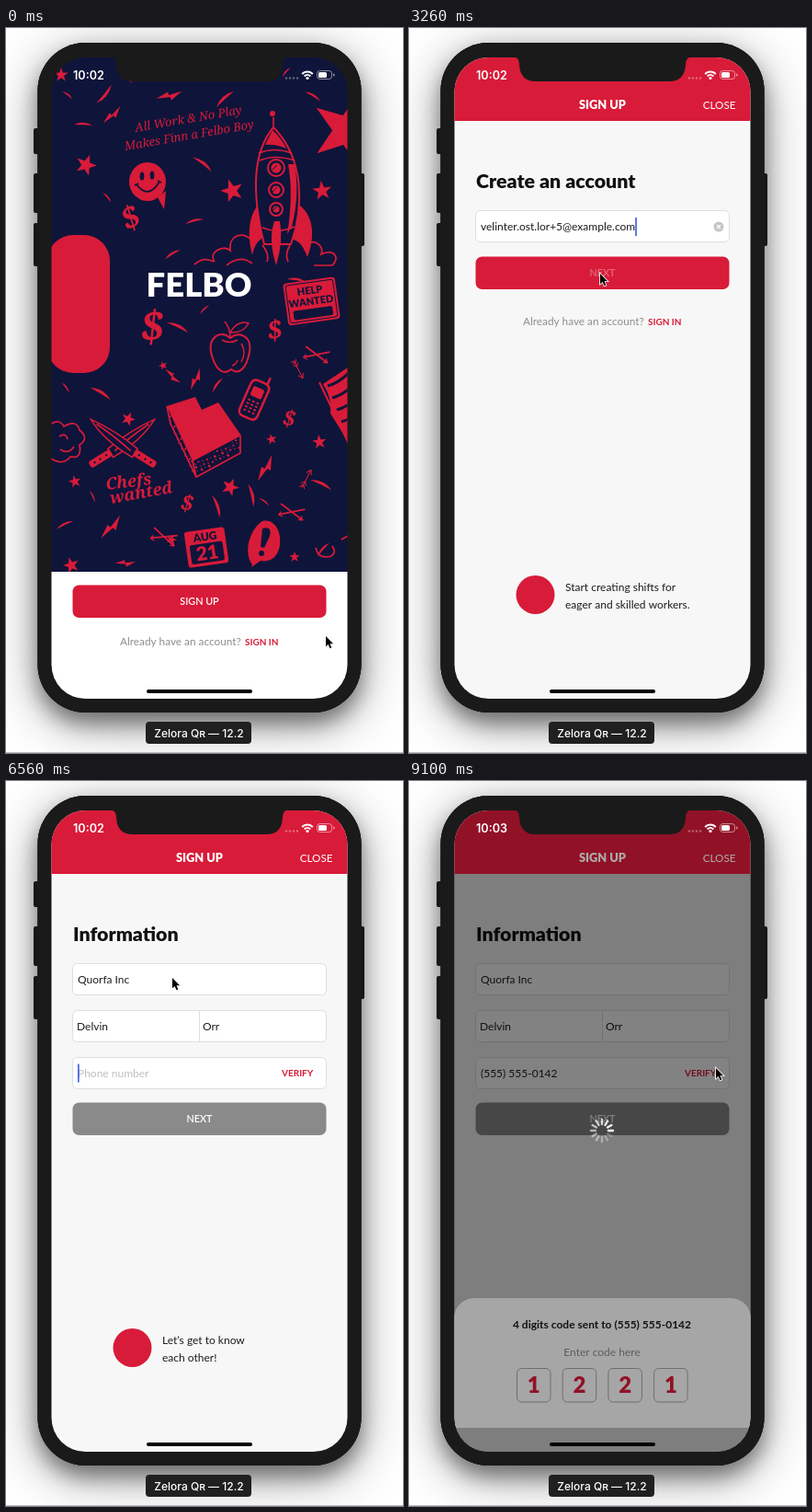
These frames come from a looping animation (432x788 px, 9120 ms). An HTML page with a canvas:

```html
<!DOCTYPE html>
<html lang="en">
<head>
<meta charset="utf-8">
<title>Sign up flow</title>
<style>
html, body { margin: 0; width: 100%; height: 100%; overflow: hidden; background: #fff; }
canvas { display: block; }
</style>
</head>
<body>
<canvas id="stage" width="432" height="788"></canvas>
<script>
const c = document.getElementById('stage').getContext('2d');
const LOOP = 9120;
const RED = '#d81b39', NAVY = '#0f143a', PAPER = '#f7f7f7', INK = '#1c1c1e';
const BODY = 'Lato, sans-serif', UI = 'Inter, sans-serif', SCRIPT = '"Noto Serif", serif';
const EMAIL = 'velinter.ost.lor+5@example.com', PHONE = '(555) 555-0142';

const clamp = v => Math.max(0, Math.min(1, v));
const span = (t, a, b) => clamp((t - a) / (b - a));
const easeOut = p => 1 - (1 - p) ** 3;
const smooth = p => p * p * (3 - 2 * p);
const between = (t, a, b) => t >= a && t < b;
const typed = (s, t, a, b) => s.slice(0, Math.floor(span(t, a, b) * s.length));

function box(x, y, w, h, r, fill, stroke) {
  c.beginPath();
  c.roundRect(x, y, w, h, r);
  if (fill) { c.fillStyle = fill; c.fill(); }
  if (stroke) { c.strokeStyle = stroke; c.lineWidth = 1; c.stroke(); }
}
function disc(x, y, rx, color, ry = rx) {
  c.fillStyle = color;
  c.beginPath();
  c.ellipse(x, y, rx, ry, 0, 0, 7);
  c.fill();
}
function ring(x, y, r, w, color = RED) {
  c.strokeStyle = color;
  c.lineWidth = w;
  c.beginPath();
  c.arc(x, y, r, 0, 7);
  c.stroke();
}
function shape(d, color = RED) {
  c.fillStyle = color;
  c.fill(new Path2D(d));
}
function line(d, w = 1.5, color = RED) {
  c.strokeStyle = color;
  c.lineWidth = w;
  c.stroke(new Path2D(d));
}
function text(s, x, y, font, color, align = 'left') {
  c.font = font;
  c.fillStyle = color;
  c.textAlign = align;
  c.fillText(s, x, y);
}
function at(x, y, angle, draw, scale = 1) {
  c.save();
  c.translate(x, y);
  c.rotate(angle);
  c.scale(scale, scale);
  draw();
  c.restore();
}

// Wallpaper doodles
function star(x, y, r, angle = 0) {
  c.fillStyle = RED;
  c.beginPath();
  for (let i = 0; i < 10; i++) {
    const a = angle - Math.PI / 2 + i * Math.PI / 5, q = i % 2 ? r * 0.4 : r;
    c.lineTo(x + q * Math.cos(a), y + q * Math.sin(a));
  }
  c.fill();
}
const bolt = (x, y, a, k) => at(x, y, a, () => shape('M-16 3L-2 -5L-1 -1L15 -6L2 5L1 1Z'), k);
const dash = (x, y, a, k) => at(x, y, a, () => shape('M-10 1Q0 -5 10 0Q0 0 -10 1Z'), k);
const dollar = (x, y, size, a) => at(x, y, a, () => text('$', 0, size * 0.36, `italic bold ${size}px ${SCRIPT}`, RED, 'center'));
function cross(x, y, a) {
  at(x, y, a, () => {
    line('M-14 -5L14 5M-13 7L13 -7', 1.8);
    line('M14 5l-5 1M14 5l-3 -4M-13 7l2 -4M-13 7l5 1', 1.2);
  });
}
function arrow(x, y, a) {
  at(x, y, a, () => line('M-11 0H11M11 0l-5 -3M11 0l-5 3M-11 -3l4 3l-4 3M-7 -3l4 3l-4 3', 1));
}

function speechFace() {
  shape('M172 197Q168 190 165 184L174 177Q173 190 172 197Z');
  disc(154, 167, 20, RED, 21);
  disc(148, 161, 2.4, NAVY, 4.5);
  disc(159, 160, 2.4, NAVY, 4.5);
  line('M142 170Q155 187 167 167M140 171l4 -2M165 166l4 2', 1.8, NAVY);
}

function rocket() {
  line('M227 254C219 243 238 235 244 242C242 222 262 222 267 231M325 242C330 224 348 236 343 246C357 239 364 250 355 258H335M205 257q10 -9 21 -3M240 258q15 -12 28 -2', 1.7);
  shape('M278 188C264 202 262 222 268 247C271 232 278 227 287 226Z');
  shape('M316 190C335 202 337 226 328 249C323 235 317 229 307 229Z');
  shape('M291 108C264 140 271 195 281 235H310C324 196 325 142 291 108Z', NAVY);
  line('M291 108C264 140 271 195 281 235H310C324 196 325 142 291 108Z', 2);
  line('M291 108V97M275 136Q292 129 311 136M276 144Q293 137 314 144M279 217Q295 224 314 216', 1.7);
  shape('M282 127L290 111Q300 120 305 131Q293 126 282 127Z');
  shape('M307 148Q313 181 306 224L311 216Q320 181 314 148Z');
  disc(290, 93, 3, RED);
  for (const [y, r] of [[152, 9], [176, 8], [197, 7]]) {
    ring(294, y, r, 2);
    disc(294, y, r - 3.5, RED);
    line(`M290 ${y + 2}l5 -5`, 1, NAVY);
  }
  shape('M292 210Q285 230 294 258Q302 231 298 210Z');
  line('M279 236Q287 246 284 254M309 236Q303 246 307 254', 1.8);
}

function wantedSign() {
  at(332, 297, -0.14, () => {
    box(-28, -23, 57, 46, 4, RED);
    box(-25.5, -20.5, 52, 41, 3, null, NAVY);
    text('HELP', 0, -8, `900 11px ${BODY}`, NAVY, 'center');
    text('WANTED', 0, 4, `900 11px ${BODY}`, NAVY, 'center');
    box(-21, 8, 43, 10, 2, NAVY);
  });
}

function apple() {
  line('M244 337C233 327 218 337 224 356C229 374 238 377 245 371C254 378 262 369 265 352C268 335 254 329 244 337Z', 2);
  line('M244 337Q244 326 238 319M244 331Q252 317 264 321Q258 332 244 331M235 339q8 5 17 0M256 343q6 9 0 20M252 361q-2 5 -6 6', 1.5);
}

function handset() {
  at(270, 403, 0.42, () => {
    box(-10, -20, 21, 42, 6, NAVY);
    line('M-4 -20H4Q11 -20 11 -13V15Q11 22 4 22H-4Q-10 22 -10 15V-13Q-10 -20 -4 -20ZM7 -20V-28', 2.5);
    box(-6, -13, 13, 11, 2, RED);
    for (let i = 0; i < 12; i++) box(-6 + i % 3 * 5, 2 + Math.floor(i / 3) * 4, 3, 2, 1, RED);
  });
}

function block() {
  shape('M175 411L179 430L207 488L255 462V442L203 470Z', NAVY);
  line('M175 411L179 430L207 488L255 462V443M203 470L207 488', 1.7);
  for (let i = 0; i < 70; i++) {
    const u = i * 0.618 % 1, v = 3 + i * 0.414 % 1 * 13;
    const left = i % 3 === 0;
    disc(left ? 176 + u * 28 : 205 + u * 49, (left ? 411 + u * 60 : 470 - u * 27) + v, 0.6 + i % 2 * 0.5, RED);
  }
  shape('M175 411L206 401L213 415L231 407L256 443L203 471Z');
}

function knives() {
  for (const side of [-1, 1]) {
    at(127, 453, side * 0.56, () => {
      c.scale(side, 1);
      shape('M-44 -5Q-16 -9 16 -5V6Q-20 7 -44 -5Z', NAVY);
      line('M-44 -5Q-16 -9 16 -5V6Q-20 7 -44 -5ZM-36 -4Q-10 -3 11 1', 1.6);
      box(15, -4, 27, 8, 3, RED);
      for (const x of [21, 29, 36]) disc(x, 0, 1.2, NAVY);
    });
  }
}

function calendar() {
  at(218, 564, -0.14, () => {
    box(-22, -19, 44, 39, 3, RED);
    text('AUG', 0, -7, `900 12px ${BODY}`, NAVY, 'center');
    box(-18, -4, 36, 21, 2, NAVY);
    text('21', 0, 14, `900 21px ${BODY}`, RED, 'center');
  });
}

function alertBubble() {
  shape('M268 583C258 570 265 545 279 536C292 533 300 547 298 562C296 575 288 581 277 579L267 586Z');
  shape('M279 544Q290 541 287 552L281 565L277 564Z', NAVY);
  disc(278, 571, 3, NAVY);
}

function flag() {
  shape('M372 369L345 387Q355 402 353 419L372 449Z');
  for (let i = 0; i < 4; i++) line(`M${350 + i * 5} ${389 + i * 13}q12 -3 25 -16`, 3, NAVY);
  line('M341 385L374 454', 2);
}

function lettering() {
  const font = `italic 300 13px ${SCRIPT}`;
  at(199, 103, -0.17, () => text('All Work & No Play', 0, 0, font, RED, 'center'));
  at(200, 121, -0.17, () => text('Makes Finn a Felbo Boy', 0, 0, font, RED, 'center'));
  at(134, 499, -0.12, () => text('Chefs', 0, 0, `italic bold 18px ${SCRIPT}`, RED, 'center'));
  at(148, 511, -0.18, () => text('wanted', 0, 0, `italic bold 18px ${SCRIPT}`, RED, 'center'));
}

const STARS = [[60, 51, 8], [87, 149, 12], [246, 177, 13], [344, 177, 11], [133, 425, 8], [75, 493, 7], [289, 447, 6],
  [244, 499, 10], [341, 450, 8], [71, 584, 9], [180, 556, 6], [314, 575, 6], [171, 367, 5]];
const BOLTS = [[116, 95, -0.5, 0.8], [178, 74, 0, 0.9], [181, 379, 1, 0.7], [207, 382, -0.9, 0.8], [283, 479, -0.8, 1], [115, 543, -0.6, 1], [130, 582, 0.2, 0.7]];
const DASHES = [[67, 73, 0.7], [84, 105, 0.1], [107, 72, 2.3], [132, 56, 0.6], [205, 210, -0.2], [214, 148, 0.7], [110, 184, 0.9],
  [181, 246, -0.5], [103, 397, 0.6], [65, 391, 1], [230, 388, -0.9], [187, 325, 0.5], [216, 306, -0.7], [316, 274, 0.2],
  [267, 508, 1.4], [281, 515, 0.7], [345, 567, -0.8], [343, 496, 0.5], [94, 509, 1.2], [64, 540, -0.4], [229, 520, 1.3], [305, 48, -0.8], [334, 74, 0.6], [238, 77, -0.7]];

function wallpaper() {
  c.fillStyle = NAVY;
  c.fillRect(49, 32, 323, 559);
  STARS.forEach(([x, y, r], i) => star(x, y, r, Math.sin(i * 2) * 0.4));
  star(372, 111, 42, 0.3);
  BOLTS.forEach(b => bolt(...b));
  DASHES.forEach(([x, y, a], i) => dash(x, y, a, 0.7 + i % 3 * 0.3));
  dollar(135, 206, 34, -0.5);
  dollar(159, 324, 46, -0.1);
  dollar(292, 328, 29, -0.2);
  dollar(308, 424, 24, 0.1);
  dollar(197, 516, 24, 0.1);
  cross(338, 355, 0.3);
  cross(311, 526, 0.3);
  cross(172, 553, 0.4);
  arrow(318, 371, 1.1);
  arrow(327, 490, -1.1);
  lettering();
  speechFace();
  rocket();
  box(45, 225, 68, 150, 28, RED);
  wantedSign();
  apple();
  handset();
  line('M48 431Q58 424 63 433Q77 425 80 437Q91 446 80 453Q83 469 70 466Q62 476 49 468M58 444q7 -5 9 3M59 458q9 6 15 -3', 1.7);
  knives();
  block();
  calendar();
  alertBubble();
  flag();
  line('M337 565q3 13 17 9q6 -4 1 -11M365 556l7 -4', 1.8);
  text('FELBO', 210, 291.5, `900 36.5px ${BODY}`, '#fff', 'center');
}

// App screens
function button(label, y, color, pressed) {
  box(72.5, y - 0.5, 276, 35.5, 7, color);
  text(label, 210.5, y + 21, `600 10.8px ${BODY}`, pressed ? 'rgba(255,255,255,.35)' : '#fff', 'center');
}
function account(y) {
  text('Already have an account?', 124, y, `11.8px ${BODY}`, '#8e8e90');
  text('SIGN IN', 260, y, `bold 10px ${BODY}`, RED);
}
function field(y) { box(72.5, y + 0.5, 276, 34, 5, '#fff', '#dedede'); }
function entry(value, hint, x, y, focused) {
  text(value || hint, x, y, `12px ${BODY}`, value ? INK : '#bfbfc2');
  if (focused) {
    c.fillStyle = '#4663e0';
    c.fillRect(x + (value ? c.measureText(value).width : 0), y - 14, 1.7, 20);
  }
}
function title(s) { text(s, 73, 173.5, `900 21.4px ${BODY}`, '#111'); }
function tip(a, b) {
  disc(137.5, 616, 21, RED);
  text(a, 170, 612, `12px ${BODY}`, INK);
  text(b, 170, 631, `12px ${BODY}`, INK);
}

function splash(t) {
  wallpaper();
  c.fillStyle = '#fff';
  c.fillRect(49, 591, 323, 140);
  button('SIGN UP', 606, RED, between(t, 240, 420));
  account(671);
}

function emailPage(t) {
  const value = typed(EMAIL, t, 1450, 2750);
  title('Create an account');
  field(198);
  entry(value, 'Email', 78, 220, between(t, 1330, 3450));
  if (value) {
    disc(337, 216, 5.5, '#c4c4c7');
    line('M335 214l4 4M339 214l-4 4', 1.2, '#fff');
  }
  button('NEXT', 249, value.length > EMAIL.length - 2 ? RED : '#8a8a8a', between(t, 3180, 3420));
  account(323);
  tip('Start creating shifts for', 'eager and skilled workers.');
}

function infoPage(t) {
  title('Information');
  field(198);
  entry(typed('Quorfa Inc', t, 4420, 5100), 'Company name', 78, 220, between(t, 4200, 5250));
  field(249);
  c.fillStyle = '#dedede';
  c.fillRect(210, 249, 1, 35);
  entry(typed('Delvin', t, 5320, 5720), 'First name', 77, 271, between(t, 5250, 5850));
  entry(typed('Orr', t, 5930, 6200), 'Last name', 214, 271, between(t, 5850, 6340));
  field(300);
  entry(typed(PHONE, t, 6640, 7310), 'Phone number', 78, 321.5, between(t, 6340, 8120));
  text('VERIFY', 300, 320.5, `bold 10px ${BODY}`, between(t, 7560, 8120) ? '#bcbcbf' : RED);
  button('NEXT', 350, '#8a8a8a');
  tip('Let\u2019s get to know', 'each other!');
}

function header() {
  c.fillStyle = RED;
  c.fillRect(49, 32, 323, 69);
  text('SIGN UP', 210.5, 88, `900 12.8px ${BODY}`, '#fff', 'center');
  text('CLOSE', 355.5, 88, `11.7px ${BODY}`, '#fff', 'right');
}

function form(t) {
  c.fillStyle = PAPER;
  c.fillRect(49, 32, 323, 760);
  const push = easeOut(span(t, 3460, 3760)) * 323;
  if (push < 323) at(-push, 0, 0, () => emailPage(t));
  if (push > 0) at(323 - push, 0, 0, () => infoPage(t));
  header();
}

function codeSheet(t) {
  const p = easeOut(span(t, 8120, 8320));
  if (!p) return;
  c.fillStyle = `rgba(0,0,0,${0.24 * p})`;
  c.fillRect(49, 101, 323, 630);
  at(0, (1 - p) * 170, 0, () => {
    box(49, 562, 323, 141, [22, 22, 0, 0], PAPER);
    text(`4 digits code sent to ${PHONE}`, 210, 595, `bold 12px ${BODY}`, INK, 'center');
    text('Enter code here', 210, 625, `12px ${BODY}`, '#8a8a8c', 'center');
    [8400, 8590, 8700, 8800].forEach((start, i) => {
      const x = 117.5 + i * 49.7;
      box(x, 638.5, 36.5, 36.5, 5, null, '#a4a4a6');
      if (t >= start) text('1221'[i], x + 18.3, 665, `900 24px ${BODY}`, RED, 'center');
    });
  });
}

function loader(t) {
  const p = span(t, 7600, 7700) - span(t, 8060, 8150) + span(t, 8850, 8950);
  if (p <= 0) return;
  c.fillStyle = `rgba(0,0,0,${0.33 * p})`;
  c.fillRect(49, 32, 323, 700);
  const lead = Math.floor(t / 40) + 4;
  c.lineCap = 'round';
  for (let i = 0; i < 12; i++) {
    const age = ((lead - i) % 12 + 12) % 12;
    at(210, 380, i * Math.PI / 6, () => line('M0 -7V-12', 2.4, `rgba(255,255,255,${p * (1 - age * 0.07)})`));
  }
  c.lineCap = 'butt';
}

function statusBar(t) {
  text(t < 7000 ? '10:02' : '10:03', 73, 56, `600 12.6px ${UI}`, '#fff');
  for (let i = 0; i < 4; i++) disc(305 + i * 4, 54.5, 1.2, 'rgba(255,255,255,.35)');
  c.strokeStyle = '#fff';
  c.lineWidth = 2.1;
  for (const r of [4.5, 8]) {
    c.beginPath();
    c.arc(328, 55.5, r, -Math.PI * 0.76, -Math.PI * 0.24);
    c.stroke();
  }
  disc(328, 54.5, 1.6, '#fff');
  box(338.5, 46.5, 16, 9, 3, null, 'rgba(255,255,255,.5)');
  box(340, 48, 9, 6, 1.5, '#fff');
  box(356, 49.5, 1.5, 3, 1, 'rgba(255,255,255,.5)');
}

// Device frame and pointer
function body(color) { box(34.5, 16, 352, 728, 52, color); }
function shadowed(blur, dy, alpha) {
  c.save();
  c.shadowColor = `rgba(0,0,0,${alpha})`;
  c.shadowBlur = blur;
  c.shadowOffsetY = dy;
  body(INK);
  c.restore();
}
function device() {
  c.fillStyle = '#fff';
  c.fillRect(0, 0, 432, 788);
  shadowed(56, 12, 0.36);
  shadowed(22, 12, 0.42);
  for (const [x, y, h] of [[30, 109, 28], [30, 158, 43], [30, 212, 47], [382, 158, 79]]) box(x, y, 8, h, 2, '#171717');
  body('#1a1a1a');
}
function notch() {
  shape('M113 31Q120 32 120 40Q121 58 138 58H283Q300 58 301 40Q301 32 308 31Z', '#1a1a1a');
}
function caption() {
  box(152, 754, 115, 24, 4, '#202020');
  text('Zelora Q\u0280 \u2014 12.2', 210, 770.5, `500 12px ${UI}`, '#fff', 'center');
  c.fillStyle = '#bdbdbd';
  c.fillRect(0, 787, 432, 1);
}

const POINTER = [[0, 348, 661], [240, 323, 634], [800, 323, 634], [1250, 200, 214], [2850, 200, 214], [3150, 208, 267],
  [3800, 208, 267], [4150, 181, 214], [7400, 181, 214], [7550, 334, 312], [LOOP, 334, 312]];
function pointer(t) {
  const i = POINTER.findIndex(k => k[0] > t);
  const [t0, x0, y0] = POINTER[i - 1], [t1, x1, y1] = POINTER[i];
  const p = smooth(span(t, t0, t1));
  at(x0 + (x1 - x0) * p, y0 + (y1 - y0) * p, 0, () => {
    const arrowhead = 'M0 0V12.5L2.9 9.9L5 14.8L7 14L5 9.2H9Z';
    line(arrowhead, 1.8, '#fff');
    shape(arrowhead, '#000');
  }, 0.9);
}

function render(t) {
  device();
  c.save();
  c.beginPath();
  c.roundRect(49.5, 32, 322, 697, 37);
  c.clip();
  const rise = easeOut(span(t, 280, 665));
  if (rise < 1) splash(t);
  if (rise > 0) at(0, Math.round((1 - rise) * 705), 0, () => form(t));
  codeSheet(t);
  loader(t);
  statusBar(t);
  box(153, 719, 115, 4, 2, '#000');
  notch();
  c.restore();
  caption();
  pointer(t);
}

const begin = performance.now();
function tick() {
  render((performance.now() - begin) % LOOP);
  requestAnimationFrame(tick);
}
tick();
</script>
</body>
</html>
```
